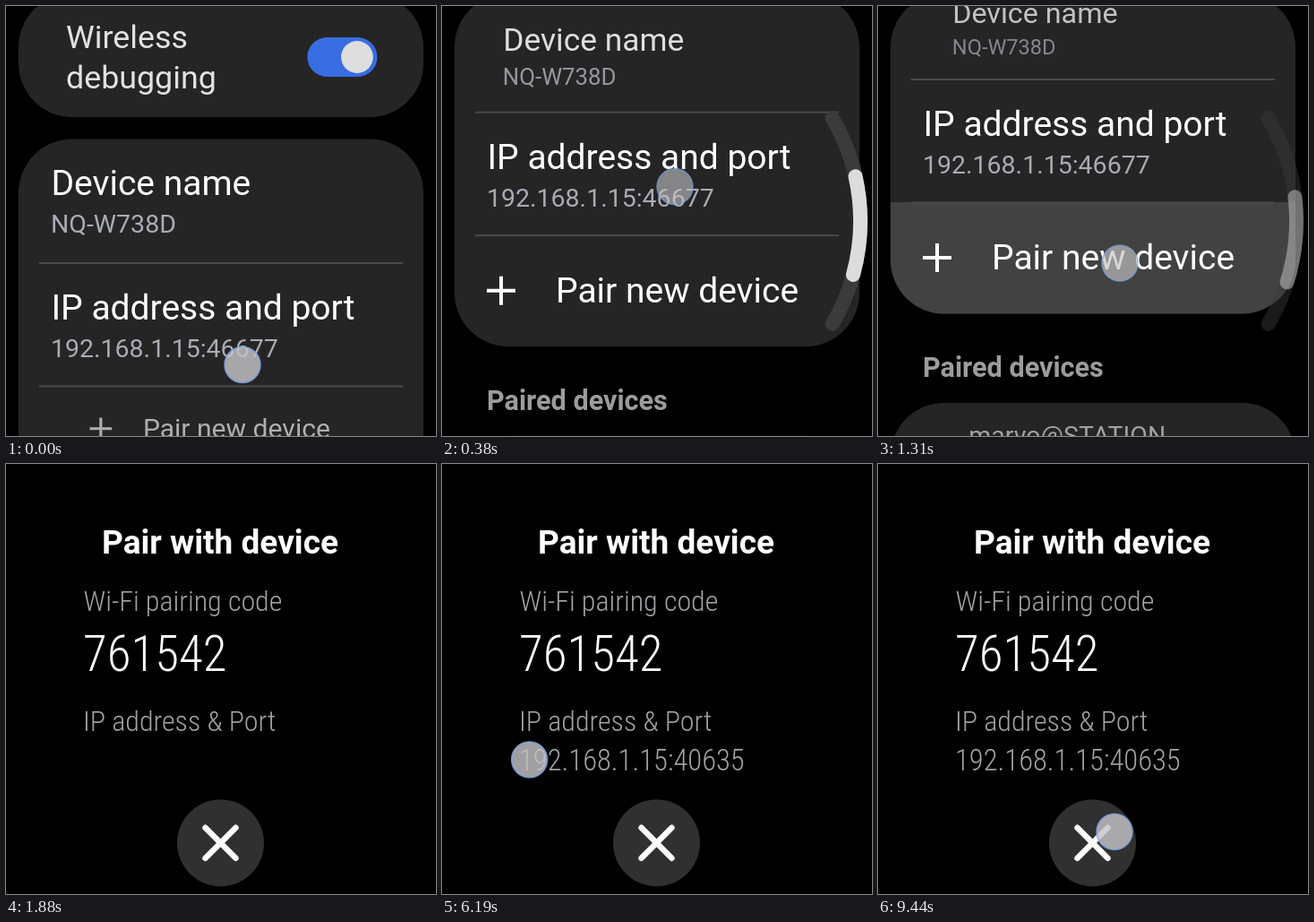
An HTML page with a canvas for the animation above (9560 ms loop, 480 by 480 pixels).

```html
<!DOCTYPE html>
<html lang="en">
<head>
<meta charset="utf-8">
<title>Watch pairing</title>
<style>
html, body { margin: 0; width: 100%; height: 100%; overflow: hidden; background: #000; }
canvas { display: block; width: 100vw; height: 100vh; }
</style>
</head>
<body>
<canvas id="stage" width="480" height="480"></canvas>
<script>
const ctx = document.getElementById('stage').getContext('2d');
const LOOP = 9560;
const SANS = 'Roboto, sans-serif';
const NARROW = '"Roboto Condensed", Roboto, sans-serif';
const TITLE = `400 39px ${SANS}`;
const SUB = `400 28.5px ${SANS}`;
const LABEL = `condensed 320 32px ${NARROW}`;
const CARD = '#252526', GREY = '#a9acb5', LABEL_GREY = '#a0a2a7';

const clamp = v => Math.max(0, Math.min(1, v));
const ramp = (t, a, b) => clamp((t - a) / (b - a));
const mix = (a, b, u) => a + (b - a) * u;
const smooth = u => u * u * (3 - 2 * u);
const rad = deg => deg * Math.PI / 180;

function text(str, x, y, font, color) {
  ctx.font = font;
  ctx.fillStyle = color;
  ctx.fillText(str, x, y);
}

function box(x, y, w, h, r, color) {
  ctx.fillStyle = color;
  ctx.beginPath();
  ctx.roundRect(x, y, w, h, r);
  ctx.fill();
}

function disc(x, y, r, color) {
  ctx.fillStyle = color;
  ctx.beginPath();
  ctx.arc(x, y, r, 0, Math.PI * 2);
  ctx.fill();
}

function cross(x, y, r, width, color) {
  ctx.strokeStyle = color;
  ctx.lineWidth = width;
  ctx.beginPath();
  ctx.moveTo(x - r, y);
  ctx.lineTo(x + r, y);
  ctx.moveTo(x, y - r);
  ctx.lineTo(x, y + r);
  ctx.stroke();
}

// Rows shrink and dim towards the screen edge they are leaving by.
function row(top, bottom, draw) {
  if (bottom < 0 || top > 480) return;
  const gap = Math.min(bottom, 480 - top);
  const scale = Math.min(1, 0.65 + 0.00216 * gap);
  const pivot = bottom < 480 - top ? bottom : top;
  ctx.save();
  ctx.globalAlpha *= 1 - (1 - scale) * 1.6;
  ctx.translate(240, pivot);
  ctx.scale(scale, scale);
  ctx.translate(-240, top - pivot);
  draw();
  ctx.restore();
}

function pairOfLines(title, sub) {
  text(title, 50.5, 63, TITLE, '#fff');
  text(sub, 50, 105, SUB, GREY);
}

function wirelessRow() {
  text('Wireless', 51.5, 64, TITLE, '#fff');
  text('debugging', 51.5, 113, TITLE, '#fff');
  box(345, 51, 85, 48, 24, '#3d78ff');
  ctx.globalAlpha = 1;
  disc(405.5, 75, 19.5, '#dedede');
}

function drawList(scroll, pressed) {
  ctx.save();
  ctx.beginPath();
  ctx.roundRect(14, -14, 452, 600, 60);
  ctx.clip();
  ctx.translate(0, -scroll);
  box(14, -60, 452, 184, 60, CARD);
  box(14, 148.5, 452, 400, 60, CARD);
  box(14, 648, 452, 140, 60, CARD);
  if (pressed) {
    ctx.globalAlpha = pressed;
    box(14, 424, 452, 124.5, [0, 0, 60, 60], '#424242');
    ctx.globalAlpha = 1;
  }
  ctx.fillStyle = '#4b4b4c';
  ctx.fillRect(37, 286, 406, 2);
  ctx.fillRect(37, 423.5, 406, 2);
  text('Paired devices', 50, 619, `600 30.6px ${SANS}`, '#9c9c9c');
  ctx.translate(0, scroll);

  row(-24 - scroll, 124 - scroll, wirelessRow);
  row(148 - scroll, 287 - scroll, () => pairOfLines('Device name', 'NQ-W738D'));
  row(287 - scroll, 424 - scroll, () => pairOfLines('IP address and port', '192.168.1.15:46677'));
  row(424 - scroll, 548 - scroll, () => {
    cross(66, 62, 16, 4, '#fff');
    text('Pair new device', 127, 75, TITLE, '#fff');
  });
  row(648 - scroll, 788 - scroll, () => text('marvo@STATION', 50, 63, TITLE, '#fff'));
  ctx.restore();
}

function arc(from, to, color) {
  ctx.strokeStyle = color;
  ctx.lineWidth = 16;
  ctx.beginPath();
  ctx.arc(240, 240, 227, rad(from), rad(to));
  ctx.stroke();
}

function drawScrollbar(scroll, alpha) {
  if (!alpha) return;
  ctx.save();
  ctx.globalAlpha = alpha;
  ctx.lineCap = 'round';
  arc(-30.4, 30.4, '#3b3b3c');
  arc(Math.max(-30.4, -12.7 + (scroll - 168) * 0.16), 15.3 + (scroll - 168) * 0.06, '#dcdcdc');
  ctx.restore();
}

function drawDialog(alpha, hasAddress) {
  ctx.save();
  ctx.globalAlpha = alpha;
  ctx.fillStyle = '#000';
  ctx.fillRect(0, 0, 480, 480);
  const zoom = mix(0.92, 1, alpha);
  ctx.translate(240, 240);
  ctx.scale(zoom, zoom);
  ctx.translate(-240, -240);
  text('Pair with device', 107, 100, `700 37px ${SANS}`, '#fff');
  text('Wi-Fi pairing code', 86.5, 164, LABEL, LABEL_GREY);
  text('761542', 86, 231, `condensed 320 55px ${NARROW}`, '#fff');
  text('IP address & Port', 86, 298, LABEL, LABEL_GREY);
  if (hasAddress) text('192.168.1.15:40635', 86, 342, `condensed 320 32.6px ${NARROW}`, LABEL_GREY);
  disc(239.5, 423, 48.5, '#303030');
  ctx.translate(239.5, 423);
  ctx.rotate(Math.PI / 4);
  ctx.lineCap = 'round';
  cross(0, 0, 24, 6.5, '#fff');
  ctx.restore();
}

function drawTouch(x, y, alpha) {
  if (alpha <= 0) return;
  ctx.save();
  ctx.globalAlpha = alpha;
  disc(x, y, 20, 'rgba(196,196,198,0.82)');
  ctx.strokeStyle = 'rgba(124,164,232,0.8)';
  ctx.lineWidth = 1.6;
  ctx.beginPath();
  ctx.arc(x, y, 20, 0, Math.PI * 2);
  ctx.stroke();
  ctx.restore();
}

// Finger path while pointing out the address and then the code: [ms, x, y].
const PATH = [
  [5130, 91, 330], [5500, 359, 318], [5940, 94, 330], [6250, 98, 330],
  [6440, 96, 328], [6640, 84, 212], [6910, 287, 207], [7200, 78.5, 215]
];

function pathAt(t) {
  let i = 0;
  while (i < PATH.length - 2 && t > PATH[i + 1][0]) i++;
  const [a, b] = [PATH[i], PATH[i + 1]];
  const u = smooth(ramp(t, a[0], b[0]));
  return [mix(a[1], b[1], u), mix(a[2], b[2], u)];
}

function drawTouches(t, scroll) {
  if (t < 700) {
    const y = 401 - scroll - 31 * ramp(t, 0, 60);
    drawTouch(264 - 4 * ramp(t, 0, 380), y, 1 - ramp(t, 340, 500));
  } else if (t < 1700) {
    drawTouch(270, 287, 0.8 * ramp(t, 1180, 1260) * (1 - ramp(t, 1380, 1540)));
  } else if (t >= 5000 && t < 9440) {
    const fade = mix(1, 0.03, ramp(t, 7200, 7380));
    drawTouch(...pathAt(t), ramp(t, 5030, 5160) * fade);
  } else if (t >= 9440) {
    drawTouch(264, 410.5, 1);
  }
}

function draw(t) {
  ctx.globalAlpha = 1;
  ctx.fillStyle = '#000';
  ctx.fillRect(0, 0, 480, 480);
  const scroll = 205 * (1 - (1 - ramp(t, 60, 795)) ** 3);
  const open = smooth(ramp(t, 1480, 1800));
  if (open < 1) {
    drawList(scroll, ramp(t, 1200, 1300));
    drawScrollbar(scroll, ramp(t, 60, 200) * (1 - ramp(t, 1060, 1520)));
  }
  if (open > 0) drawDialog(open, t >= 4060);
  drawTouches(t, scroll);
}

const start = performance.now();
function tick() {
  draw((performance.now() - start) % LOOP);
  requestAnimationFrame(tick);
}
tick();
</script>
</body>
</html>
```
